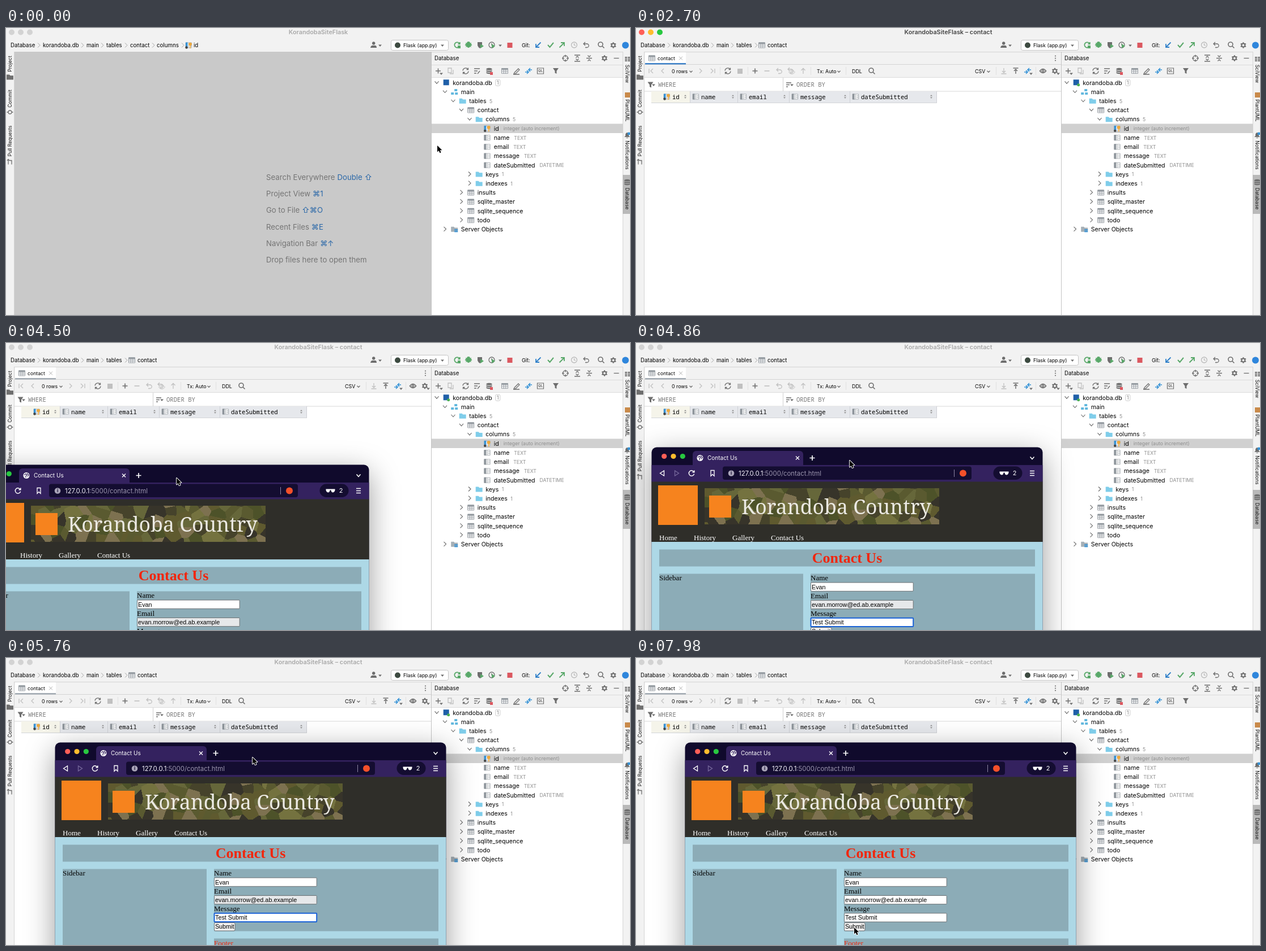
Animation of 1101x508 px, one loop 8 s. Source, as an HTML page with a canvas:

```html
<!DOCTYPE html>
<html lang="en">
<head>
<meta charset="utf-8">
<title>Database form demo</title>
<style>
html, body { margin: 0; width: 100%; height: 100%; overflow: hidden; background: #fff; }
canvas { display: block; width: 1101px; height: 508px; }
</style>
</head>
<body>
<canvas id="stage" width="1101" height="508"></canvas>
<script>
const LOOP = 8000, STEP = 60;
const canvas = document.getElementById('stage');
const ctx = canvas.getContext('2d');
const SANS = 'Inter, Roboto, sans-serif';
const MONO = '"Noto Sans Mono", "DejaVu Sans Mono", monospace';
const SERIF = '"Liberation Serif", serif';
const ARIAL = '"Liberation Sans", sans-serif';
const INK = '#6e6e6e', PALE = '#c0c0c0', BLUE = '#3592d6', GREEN = '#59a869', PANEL = '#f2f2f2';
const PLACE = 'Korandoba', USER = 'Evan', MAIL = 'evan.morrow@ed.ab.example';

// Times at which the state switches
const FOCUS = 960, OPEN = 1320, LOADED = 1740, BLUR = 3480, SENT = 7080;

// [time, x, y]
const cursorPath = [[0, 761, 208], [780, 867, 176], [1740, 867, 176], [2640, 12, 262], [2700, -40, 268],
  [3480, -330, 342], [4020, 94, 293], [4500, 301, 239], [5280, 429, 179], [5460, 436, 172],
  [5700, 436, 172], [6600, 383, 477], [6900, 383, 477], [7200, 385, 477], [8000, 385, 477]];
const windowPath = [[3480, -692, 322], [4020, -268, 273], [4500, -49, 216], [5280, 80, 157],
  [5460, 87, 150], [8000, 87, 150]];

// Monotone cubic through the knots, so nothing overshoots
function along(path, t, k) {
  const n = path.length;
  if (t <= path[0][0]) return path[0][k];
  if (t >= path[n - 1][0]) return path[n - 1][k];
  let i = 0;
  while (t >= path[i + 1][0]) i++;
  const slope = j => (path[j + 1][k] - path[j][k]) / (path[j + 1][0] - path[j][0]);
  const tangent = j => {
    if (j === 0) return slope(0);
    if (j === n - 1) return 0;
    const a = slope(j - 1), b = slope(j);
    return a * b <= 0 ? 0 : 2 * a * b / (a + b);
  };
  const h = path[i + 1][0] - path[i][0], u = (t - path[i][0]) / h, v = 1 - u;
  const p = path[i][k] * (1 + 2 * u) * v * v + tangent(i) * h * u * v * v +
    path[i + 1][k] * u * u * (3 - 2 * u) - tangent(i + 1) * h * u * u * v;
  return Math.round(p);
}

function box(x, y, w, h, color) {
  ctx.fillStyle = color;
  ctx.fillRect(x, y, w, h);
}

function round(x, y, w, h, r, fill, stroke, lw = 1) {
  ctx.beginPath();
  ctx.roundRect(x, y, w, h, r);
  if (fill) { ctx.fillStyle = fill; ctx.fill(); }
  if (stroke) { ctx.strokeStyle = stroke; ctx.lineWidth = lw; ctx.stroke(); }
}

function dot(x, y, r, color) {
  ctx.fillStyle = color;
  ctx.beginPath();
  ctx.arc(x, y, r, 0, 7);
  ctx.fill();
}

// y is the middle of the capitals; returns the right end
function text(s, x, y, size = 10.6, color = '#000', font = SANS, weight = 400, align = 'left') {
  ctx.font = `${weight} ${size}px ${font}`;
  ctx.fillStyle = color;
  ctx.textAlign = align;
  ctx.fillText(s, x, y + size * 0.36);
  return x + ctx.measureText(s).width;
}

function turned(s, x, y, dir) {
  ctx.save();
  ctx.translate(x, y);
  ctx.rotate(dir * Math.PI / 2);
  text(s, 0, 0, 8.6, '#111', SANS, 400, 'center');
  ctx.restore();
}

// Icon outlines, centred on the origin
const shapes = {
  right: 'M-2-4L2 0L-2 4', left: 'M2-4L-2 0L2 4', down: 'M-3.5-2L0 2L3.5-2', small: 'M-2.5-1.2L0 1.3L2.5-1.2',
  first: 'M3-4L-1 0L3 4M-4-4V4', last: 'M-3-4L1 0L-3 4M4-4V4',
  plus: 'M-4.5 0H4.5M0-4.5V4.5', minus: 'M-4.5 0H4.5', cross: 'M-3-3L3 3M3-3L-3 3',
  reload: 'M4-3A5 5 0 0 0-5-.5M-4 3A5 5 0 0 0 5 .5M4.5-5.5V-2.5H1.5M-4.5 5.5V2.5H-1.5',
  spin: 'M4.3-2A4.7 4.7 0 1 0 4.6 1.2M4.8-5V-1.7H1.5',
  undo: 'M-2-5L-5-2L-2 1M-5-2H1A3 3 0 0 1 1 4.5H-2',
  search: 'M3-1A4 4 0 1 1-5-1A4 4 0 1 1 3-1M2 2L5.5 5.5',
  clock: 'M5 0A5 5 0 1 1-5 0A5 5 0 1 1 5 0M0-3V0L2.5 1',
  target: 'M4.5 0A4.5 4.5 0 1 1-4.5 0A4.5 4.5 0 1 1 4.5 0M0-6V-2M0 6V2M-6 0H-2M6 0H2',
  gear: 'M3 0A3 3 0 1 1-3 0A3 3 0 1 1 3 0M0-5.3V-3M0 5.3V3M-4.6-2.6L-2.6-1.5M4.6-2.6L2.6-1.5M-4.6 2.6L-2.6 1.5M4.6 2.6L2.6 1.5',
  expand: 'M-5-5.5H5M-5 5.5H5M-2.5-1L0-3.5L2.5-1M-2.5 1L0 3.5L2.5 1',
  collapse: 'M-5 0H5M-2.5-5L0-2.5L2.5-5M-2.5 5L0 2.5L2.5 5',
  check: 'M-5 0L-1.5 4L5-4', southwest: 'M4.5-4.5L-4 4M-4-2V4H2', northeast: 'M-4.5 4.5L4-4M-2-4H4V2',
  up: 'M0 5V-4M-3.5-1L0-4.5L3.5-1', export: 'M-4.5-5H4.5M0 5V-3M-3 0L0-3L3 0', import: 'M-4.5 5H4.5M0-5V3M-3 0L0 3L3 0',
  swap: 'M-6 2H0M-3-1L0 2L-3 5M6-2H0M3-5L0-2L3 1',
  eye: 'M-5.5 0Q0-7 5.5 0Q0 7-5.5 0ZM1.7 0A1.7 1.7 0 1 1-1.7 0A1.7 1.7 0 1 1 1.7 0',
  pencil: 'M-4 3L3-4L5-2L-2 5L-5 5.5ZM-6 6H5', copy: 'M-4-5H2V3H-4ZM-1 5H5V-2',
  bars: 'M-4-4H4M-4 0H4M-4 4H4', order: 'M-5-3.5H4M-5 0H1M-5 3.5H-2', tools: 'M-5-4H5M-5 0H1M-5 4H-1M1 5L5 0',
  mark: 'M-3-5H3V5L0 2L-3 5Z', commit: 'M3 0A3 3 0 1 1-3 0A3 3 0 1 1 3 0M-5.5 0H-3M5.5 0H3',
  pull: 'M-3-4V5M-5-2L-3-4L-1-2M3 5V-2H-1', globe: 'M-4-1L-1-3L1-1L-1 1V4M1-4L4-1L2 2'
};
const solids = {
  caret: 'M-3-1.5H3L0 2Z', funnel: 'M-5-5H5L1.5 0V5L-1.5 3.5V0Z',
  folder: 'M-6-4.5H-1L.5-2.8H6V4.5H-6Z', sort: 'M-2-1L0-3.3L2-1ZM-2 1L0 3.3L2 1Z',
  user: 'M-3-3A2.7 2.7 0 1 1 2.4-3A2.7 2.7 0 0 1-3-3M-6 5Q-5 0 0 1Q5 0 5 5Z',
  bug: 'M-3-3A3 3 0 0 1 3-3L5-4V-2L4-1H6V1H4L5 4L3 3Q0 7-3 3L-5 4L-4 1H-6V-1H-4L-5-2V-4Z',
  shield: 'M-4-5H4V1Q3 4 0 6Q-3 4-4 1Z', play: 'M0-3L6 1L0 5Z', bell: 'M-5 3L-3 1V-2Q-2-5 0-5Q2-5 3-2V1L5 3ZM-1.5 4H1.5V5H-1.5Z',
  stack: 'M-5-4Q0-6.5 5-4V-2.3Q0-.3-5-2.3ZM-5-1.3Q0 .7 5-1.3V1Q0 3-5 1ZM-5 2Q0 4 5 2V4Q0 6.5-5 4Z',
  glasses: 'M-8-3H8V-1Q7 3 4 3Q1.5 3 1-1H-1Q-1.5 3-4 3Q-7 3-8-1Z',
  arrow: 'M0 0V11.5L2.7 9L4.5 13.2L6.6 12.3L4.8 8.2H8.4Z'
};

function icon(name, x, y, color = INK, width = 1.3) {
  ctx.save();
  ctx.translate(x, y);
  if (shapes[name]) {
    ctx.strokeStyle = color;
    ctx.lineWidth = width;
    ctx.stroke(new Path2D(shapes[name]));
  } else {
    ctx.fillStyle = color;
    ctx.fill(new Path2D(solids[name]));
  }
  ctx.restore();
}

function tableIcon(x, y) {
  box(x - 5.5, y - 4.5, 11, 9, '#fff');
  ctx.strokeStyle = '#8e959b';
  ctx.lineWidth = 0.9;
  ctx.stroke(new Path2D(`M${x - 5.5} ${y - 4.5}h11v9h-11zm0 3h11m-11 3h11m-7.3-6v9m3.6-9v9`));
  box(x - 5.5, y - 5, 11, 2.4, '#8e959b');
}

function columnIcon(x, y, key) {
  round(x - 5, y - 4.5, 10.5, 9, 0, '#fff', '#a3a9ae', 0.9);
  box(x - 5, y - 5, 3.5, 10, key ? BLUE : '#8e959b');
  box(x - 0.2, y - 4, 1, 8, '#a3a9ae');
  for (const d of [-2, 1]) box(x + 2, y + d, 3, 1, '#a3a9ae');
  if (key) {
    dot(x + 3, y - 2, 2.8, '#eda83b');
    box(x + 2.3, y, 1.6, 5.5, '#eda83b');
    dot(x - 3.5, y + 4, 2.2, '#444');
  }
}

function header(s) {
  box(0, 0, 1101, 42, PANEL);
  const lights = s.focus ? ['#ff5f57', '#febc2e', '#28c840'] : ['#d3d3d3', '#d3d3d3', '#d3d3d3'];
  lights.forEach((c, i) => dot(10 + 16 * i, 7.5, 5, c));
  text(PLACE + 'SiteFlask' + (s.loaded ? ' – contact' : ''), 551, 7, 10.8, s.focus ? '#454545' : '#a9a9a9', SANS, 600, 'center');

  const crumbs = [['Database', 8], [PLACE.toLowerCase() + '.db', 65], ['main', 142], ['tables', 177]];
  if (s.loaded) crumbs.push(['contact', 232]);
  else crumbs.push(['contact', 219], ['columns', 266], ['id', 331]);
  for (const [word, x] of crumbs) text(word, x, 30.5, 9.7);
  for (const x of s.loaded ? [58, 135, 170, 212] : [58, 135, 170, 212, 260, 312]) icon('right', x, 30.5, '#999', 0.9);
  if (s.loaded) tableIcon(222, 30.5); else columnIcon(322, 30.5, true);

  icon('user', 649, 30);
  icon('caret', 660, 31);
  round(679.5, 21.5, 101, 18, 3, '#fff', '#c4c4c4');
  dot(691, 30.5, 5, '#3c4a40');
  text('Flask (app.py)', 701, 30.5, 8.9);
  icon('caret', 770, 31);
  icon('spin', 796, 30, GREEN, 1.8);
  box(797, 31, 5, 5, GREEN);
  icon('bug', 816, 30, GREEN);
  icon('shield', 836, 30);
  icon('play', 837, 31, GREEN);
  icon('clock', 857, 30, INK, 1.3);
  icon('play', 857, 31, GREEN);
  icon('caret', 872, 31);
  box(884.5, 26, 9, 9, '#db5860');
  text('Git:', 910, 30.5, 9.2);
  icon('southwest', 939, 30, '#3181ca', 1.8);
  icon('check', 961, 30, GREEN, 2);
  icon('northeast', 981, 30, GREEN, 1.8);
  icon('clock', 1002.5, 30, '#bababa');
  icon('undo', 1024, 30);
  icon('search', 1050, 30, INK, 1.6);
  icon('gear', 1071.5, 30.5, INK, 2);
  dot(1093, 30.5, 6, '#2f86dc');
}

function sideBars() {
  box(0, 42, 15, 466, PANEL);
  box(14, 42, 1, 466, '#d4d4d4');
  turned('Project', 7, 63.5, -1);
  icon('folder', 7, 87);
  turned('Commit', 7, 125, -1);
  icon('commit', 7, 149);
  turned('Pull Requests', 7, 200, -1);
  icon('pull', 7, 236.5);
  box(1088, 42, 13, 466, PANEL);
  box(1088, 42, 1, 466, '#d4d4d4');
  box(1088, 260, 13, 69, '#b9b9b9');
  for (let i = 0; i < 3; i++) for (let j = 0; j < 2; j++) box(1092 + j * 5, 51 + i * 3, 4, 2, INK);
  turned('SciView', 1096, 81, 1);
  box(1092, 114, 9, 9, '#c98a4a');
  turned('PlantUML', 1096, 146, 1);
  icon('bell', 1096, 190);
  dot(1099, 187, 2.5, BLUE);
  turned('Notifications', 1096, 225, 1);
  icon('stack', 1096, 273);
  turned('Database', 1096, 302, 1);
}

// [level, state, icon, label, note]
const tree = [
  [0, 'down', 'db', PLACE.toLowerCase() + '.db', '1'], [1, 'down', 'schema', 'main'], [2, 'down', 'folder', 'tables', '5'],
  [3, 'down', 'table', 'contact'], [4, 'down', 'folder', 'columns', '5'], [5, '', 'key', 'id', 'integer (auto increment)'],
  [5, '', 'column', 'name', 'TEXT'], [5, '', 'column', 'email', 'TEXT'], [5, '', 'column', 'message', 'TEXT'],
  [5, '', 'column', 'dateSubmitted', 'DATETIME'], [4, 'right', 'folder', 'keys', '1'], [4, 'right', 'folder', 'indexes', '1'],
  [3, 'right', 'table', 'insults'], [3, 'right', 'table', 'sqlite_master'], [3, 'right', 'table', 'sqlite_sequence'],
  [3, 'right', 'table', 'todo'], [1, 'right', 'server', 'Server Objects']
];

function databasePanel(s) {
  box(750, 42, 338, 46, PANEL);
  box(750, 88, 338, 420, '#fff');
  box(750, 42, 338, 1, '#d4d4d4');
  box(750, 65, 338, 1, '#dcdcdc');
  box(750, 87, 338, 1, '#dcdcdc');
  box(750, 42, 1, 466, '#c4c4c4');
  text('Database', 756, 54, 9.7);
  icon('target', 987, 53.5);
  icon('expand', 1008, 53.5);
  icon('collapse', 1029, 53.5);
  icon('gear', 1056, 53.5, INK, 2);
  icon('minus', 1077, 53.5);
  icon('plus', 762.5, 76, INK, 1.5);
  icon('caret', 768, 81);
  icon('copy', 784, 76, PALE);
  icon('reload', 811, 76);
  icon('tools', 831, 76);
  icon('stack', 852.5, 76);
  box(854, 78, 5, 5, '#db5860');
  tableIcon(880, 76);
  icon('pencil', 901, 76);
  icon('swap', 922, 76, BLUE, 1.6);
  round(937.5, 71, 11, 10, 0, null, INK, 1.2);
  text('QL', 943, 76, 6, INK, SANS, 700, 'center');
  icon('funnel', 970, 76);

  box(751, 169.5, 337, 16.5, '#d0d0d0');
  tree.forEach(([level, state, kind, label, note], row) => {
    const y = 96.8 + 16.22 * row, x = 760 + 14.5 * level, ix = x + 16.7;
    if (state) icon(state, x, y - 0.5, '#6a6a6a', 1.1);
    if (kind === 'db') {
      box(ix - 5, y - 5.5, 10, 10, '#1f5fa8');
      if (s.open) dot(ix + 4, y + 4, 2.5, '#4caf50');
    } else if (kind === 'schema') {
      for (const [dx, dy] of [[-6, 1], [0, -5], [1, 1]]) box(ix + dx, y + dy, 5, 4, '#62b8de');
    } else if (kind === 'table') tableIcon(ix, y);
    else if (kind === 'folder') icon('folder', ix, y, '#7fcdea');
    else if (kind === 'server') {
      icon('folder', ix, y, '#a6b0b7');
      for (const d of [0, 3]) box(ix, y + d, 6, 2, BLUE);
    } else columnIcon(ix - 0.5, y, kind === 'key');
    const end = text(label, x + 28.2, y);
    if (!note) return;
    if (kind === 'db') {
      round(end + 6, y - 5.5, 8, 11, 2, null, '#c6c6c6', 0.9);
      text(note, end + 10, y, 8.4, '#777', SANS, 400, 'center');
    } else text(note, end + (level === 5 ? 8 : 5.5), y + 0.3, 8.7, '#8e8e8e');
  });
}

function welcome() {
  box(15, 42, 735, 466, '#c9c9c9');
  const tips = [['Search Everywhere', 'Double ⇧'], ['Project View', '⌘1'], ['Go to File', '⇧⌘O'],
    ['Recent Files', '⌘E'], ['Navigation Bar', '⌘↑'], ['Drop files here to open them', '']];
  tips.forEach(([label, keys], i) => {
    const y = 264 + 29.25 * i, end = text(label, 459, y, 13.2, '#747474');
    text(keys, end + 4, y, 13.2, '#2967a8');
  });
}

function dataView(s) {
  box(15, 42, 735, 46, PANEL);
  box(15, 88, 735, 420, '#fff');
  box(15, 42, 735, 1, '#d4d4d4');
  box(16, 43, 72, 21, '#fff');
  box(15, 64, 735, 1, '#d4d4d4');
  box(16, 62, 72, 2.5, s.focus ? '#4083c9' : '#a4acb4');
  tableIcon(28, 53.5);
  text('contact', 38, 53.5, 8.7);
  icon('cross', 79, 53.5, '#b0b0b0', 1);
  for (const d of [-4, 0, 4]) dot(740, 53.5 + d, 1.1, INK);

  for (const [name, x] of [['first', 27], ['left', 47], ['right', 114], ['last', 135], ['undo', 253], ['up', 295], ['import', 649]]) {
    icon(name, x, 76, PALE);
  }
  text('0 rows', 63, 76.5, 8.8);
  icon('small', 97, 77);
  icon('reload', 162, 76);
  box(179, 72, 9, 9, PALE);
  icon('plus', 210, 76, INK, 1.6);
  icon('minus', 231, 76, PALE, 1.6);
  icon('undo', 273, 75, PALE);
  icon('eye', 275, 78, PALE, 1);
  for (const x of [148, 197, 308, 370, 635, 705]) box(x, 69, 1, 14, '#e0e0e0');
  text('Tx: Auto', 319, 76.5, 8.9);
  icon('small', 358, 77);
  text('DDL', 381, 76.5, 8.9);
  icon('search', 416, 76, INK, 1.6);
  text('CSV', 598, 76.5, 8.9);
  icon('small', 622, 77);
  icon('export', 670, 76, INK, 1.5);
  icon('swap', 691, 76, BLUE, 1.6);
  icon('caret', 697, 81);
  icon('eye', 718, 76, INK, 1.6);
  icon('gear', 739, 76, INK, 2);
  icon('caret', 745, 81);
  box(15, 87, 735, 1, '#dcdcdc');
  if (!s.loaded) return;

  box(15, 111.5, 735, 1, '#d8d8d8');
  box(259, 88, 1, 24, '#d0d0d0');
  icon('funnel', 25.5, 100.5);
  icon('caret', 31, 101);
  text('WHERE', 39, 100.5, 10.6, '#777', MONO);
  icon('order', 270, 100.5);
  icon('caret', 275, 101);
  text('ORDER BY', 283, 100.5, 10.6, '#777', MONO);
  box(27, 112, 504, 20, '#e6e8ec');
  box(27, 112, 68, 20, '#f5f4ea');
  box(27, 132, 504, 1, '#d2d4d8');
  const columns = [['id', 54, 87, 95], ['name', 105, 171, 179], ['email', 189, 262, 270],
    ['message', 280, 369, 377], ['dateSubmitted', 387, 521, 530]];
  for (const [label, x, sort, edge] of columns) {
    columnIcon(x, 121.5, label === 'id');
    text(label, x + 10, 122, 10.6, '#000', MONO);
    icon('sort', sort, 121.5, '#888');
    box(edge, 112, 1, 20, '#cfd1d6');
  }
}

// Banner picture: seeded mosaic of nearest-point cells
const mosaic = (() => {
  const w = 414, h = 64, cell = 18, cols = 25;
  const pic = document.createElement('canvas');
  pic.width = w;
  pic.height = h;
  const g = pic.getContext('2d');
  let seed = 41;
  const rnd = () => (seed = seed * 16807 % 2147483647) / 2147483647;
  const tones = ['#5a5a30', '#66673a', '#46432b', '#74723f', '#37342a', '#7d7150', '#4d5229', '#5f5a2f'];
  const seeds = [];
  for (let j = -1; j < 5; j++) for (let i = -1; i < cols - 1; i++) {
    seeds.push([(i + rnd()) * cell, (j + rnd()) * cell, tones[Math.floor(rnd() * tones.length)]]);
  }
  for (let y = 0; y < h; y++) for (let x = 0; x < w; x++) {
    let best = 1e9, color;
    for (const [sx, sy, tone] of seeds) {
      const d = (x - sx) ** 2 + (y - sy) ** 2;
      if (d < best) { best = d; color = tone; }
    }
    g.fillStyle = color;
    g.fillRect(x, y, 1, 1);
  }
  return pic;
})();

function field(label, value, y, fill, ring) {
  text(label, 367, y, 13, '#000', SERIF);
  round(367.5, y + 8.2, 180.7, 15.3, 1, fill, ring ? '#1a62d6' : '#6a6f72', ring ? 2 : 1);
  text(value, 369, y + 16, 10.8, '#000', ARIAL);
}

// Laid out for a window whose corner is at 87,150
function browser(x, y, s) {
  const frame = [86.5, 149.5, 690, 560, 9];
  ctx.save();
  ctx.translate(x - 87, y - 150);
  ctx.save();
  ctx.shadowColor = 'rgba(0,0,0,.4)';
  ctx.shadowBlur = 52;
  ctx.shadowOffsetY = 14;
  round(...frame, '#100a2c');
  ctx.restore();
  ctx.beginPath();
  ctx.roundRect(...frame);
  ctx.clip();
  box(86, 181, 691, 30, '#34225f');
  round(159, 156, 195, 30, [6, 6, 0, 0], '#34225f');
  ['#ff5f57', '#febc2e', '#28c840'].forEach((c, i) => dot(108.7 + 16.3 * i, 165.5, 4.6, c));
  dot(172, 168.5, 5.5, '#fff');
  icon('globe', 172, 168.5, '#34225f', 1.2);
  text('Contact Us', 185, 168.5, 10, '#fff');
  icon('cross', 344, 168.5, '#fff', 1.3);
  icon('plus', 370, 168.5, '#fff', 1.7);
  icon('down', 758, 168.5, '#fff', 1.5);

  ctx.lineWidth = 1.3;
  ctx.strokeStyle = '#fff';
  ctx.stroke(new Path2D('M108.5 191V200L101.5 195.5Z'));
  ctx.strokeStyle = '#75679a';
  ctx.stroke(new Path2D('M127.5 191V200L134.5 195.5Z'));
  icon('spin', 157, 195.5, '#fff', 1.5);
  icon('mark', 194, 195.5, '#fff', 1.3);
  round(212, 183.5, 439, 23.5, 4, '#140d31');
  dot(227, 195.5, 5.3, '#a9a4b8');
  text('i', 227, 195.5, 8, '#140d31', SANS, 700, 'center');
  const end = text('127.0.0.1', 240, 195.5, 11.4, '#f4f2fa');
  text(':5000/contact.html', end, 195.5, 11.4, '#9a94ad');
  box(620, 189, 1, 13, '#8d86a3');
  dot(636, 195.5, 6, '#f4502a');
  round(689.5, 183.5, 51, 23.5, 11.7, '#140d31');
  icon('glasses', 708.5, 195.5, '#fff');
  text('2', 727, 195.5, 11, '#fff', SANS, 400, 'center');
  icon('bars', 758, 195.5, '#fff', 1.4);

  box(86, 210.5, 691, 107, '#2f2e29');
  box(98, 217, 70, 70, '#f6831e');
  ctx.drawImage(mosaic, 180, 222);
  box(188, 235, 39, 39, '#f6831e');
  text(PLACE + ' Country', 245, 255.5, 35.6, '#ebe9e2', '"Noto Serif", "Liberation Serif", serif', 300);
  for (const [word, wx] of [['Home', 100], ['History', 161], ['Gallery', 229], ['Contact Us', 297]]) {
    text(word, wx, 309.4, 13, '#fff', SERIF);
  }

  box(86, 317, 691, 400, '#add8e6');
  const shade = '#8cacb7';
  box(100, 330.5, 663, 30, shade);
  text('Contact Us', 431.5, 345, 26, '#f2250b', SERIF, 700, 'center');
  box(100, 373.5, 254, 300, shade);
  text('Sidebar', 100, 380.8, 13, '#000', SERIF);
  box(367, 373.5, 396, 110, shade);
  field('Name', USER, 380.8, '#fff');
  field('Email', MAIL, 412.2, s.sent ? '#fff' : '#e6e8ea');
  field('Message', 'Test Submit', 443.6, '#fff', !s.sent);
  round(367.5, 468.5, 36.5, 14.5, 2, s.hover ? '#e2e2e2' : '#efefef', '#6a6f72');
  text('Submit', 385.7, 475.5, 10.8, '#000', ARIAL, 400, 'center');
  box(367, 496.5, 396, 40, shade);
  text('Footer', 367, 504.3, 13, '#f2250b', SERIF);
  ctx.restore();
}

function pointer(x, y) {
  ctx.save();
  ctx.translate(x, y);
  const p = new Path2D(solids.arrow);
  ctx.strokeStyle = '#fff';
  ctx.lineWidth = 1.8;
  ctx.lineJoin = 'round';
  ctx.stroke(p);
  ctx.fillStyle = '#000';
  ctx.fill(p);
  ctx.restore();
}

function draw(t) {
  const s = {
    focus: t >= FOCUS && t < BLUR, open: t >= OPEN, loaded: t >= LOADED,
    sent: t >= SENT, hover: t >= 6540 && t < SENT
  };
  header(s);
  if (s.open) dataView(s); else welcome();
  databasePanel(s);
  sideBars();
  if (t >= BLUR) browser(along(windowPath, t, 1), along(windowPath, t, 2), s);
  pointer(along(cursorPath, t, 1), along(cursorPath, t, 2));
}

const start = performance.now();
let last = -1;
function tick() {
  const t = Math.floor((performance.now() - start) % LOOP / STEP) * STEP;
  if (t !== last) draw(last = t);
  requestAnimationFrame(tick);
}
tick();
</script>
</body>
</html>
```
